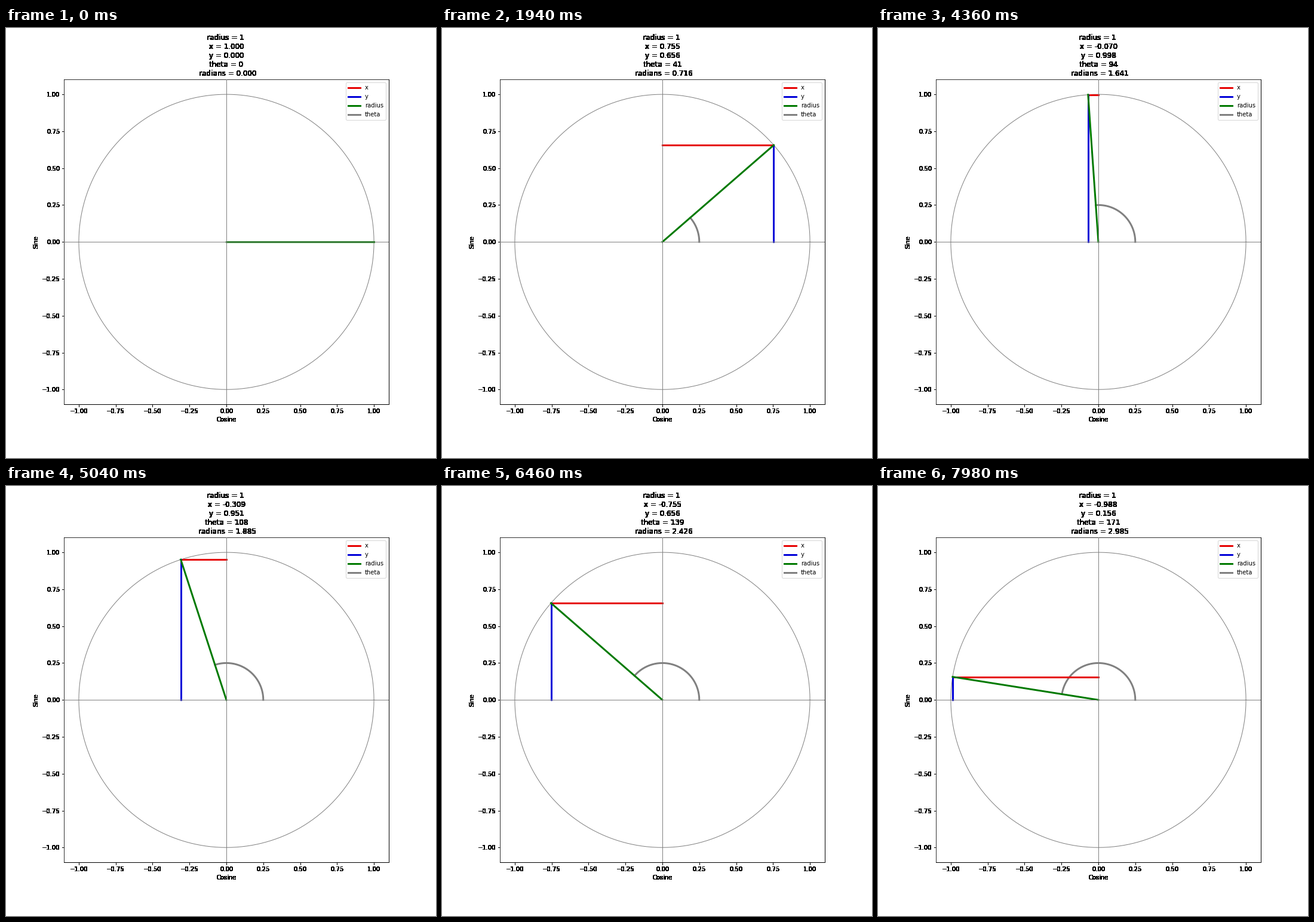
Animation, 720 px wide and 720 px high, one loop 8000 ms. Source, as a matplotlib script:

```python
import numpy as np
import matplotlib.pyplot as plt
from matplotlib.animation import FuncAnimation
from matplotlib.lines import Line2D

SIZE, DPI = 720, 72
SIDE = 0.755                       # square plot area, share of the figure
RECT = [0.5125 - SIDE / 2, 0.125, SIDE, SIDE]
LIMIT = 1.1
COLORS = {"x": "#e60000", "y": "#0000d8", "radius": "#007a00", "theta": "gray"}

plt.rcParams["font.family"] = "DejaVu Sans"
fig = plt.figure(figsize=(SIZE / DPI, SIZE / DPI), dpi=DPI, facecolor="white")


def harden(im, dpi):
    """Turn every touched pixel solid black, without soft edges."""
    im[..., :3] = 0
    im[..., 3] = im[..., 3] > 0
    return im, 0, 0


def add_axes():
    return fig.add_axes(RECT, xlim=(-LIMIT, LIMIT), ylim=(-LIMIT, LIMIT))


def draw_static():
    """Render the fixed parts once and return them as an image."""
    ax = add_axes()
    ax.set_xticks(np.arange(-1, 1.01, 0.25))
    ax.set_yticks(np.arange(-1, 1.01, 0.25))
    ax.set_xlabel("Cosine")
    ax.set_ylabel("Sine")

    turn = np.linspace(0, 2 * np.pi, 361)
    ax.plot(np.cos(turn), np.sin(turn), color="gray", lw=1)

    keys = [Line2D([], [], color=c, lw=3, label=n) for n, c in COLORS.items()]
    ax.legend(handles=keys, loc="upper right")

    # A clear figure made opaque afterwards gives hard text around the axes.
    fig.patch.set_alpha(0)
    fig.canvas.draw()
    image = np.array(fig.canvas.buffer_rgba())
    image[..., 3] = 255
    fig.patch.set_alpha(1)
    ax.remove()
    return image


fig.figimage(draw_static(), origin="upper", zorder=-1)

ax = add_axes()
ax.axis("off")
title = ax.set_title("")
title.set_agg_filter(harden)
lines = {n: ax.plot([], [], color=c, lw=3)[0] for n, c in COLORS.items()}
lines["theta"].set_zorder(1.9)
ax.axvline(0, color="gray", lw=1)
ax.axhline(0, color="gray", lw=1)


def degrees(frame):
    """Three steps every seven ticks, held for 1, 5 and 1 ticks."""
    cycle, tick = divmod(frame, 7)
    return 3 * cycle + (tick >= 1) + (tick >= 6)


def update(frame):
    theta = degrees(frame)
    rad = np.radians(theta)
    x, y = np.cos(rad), np.sin(rad)
    sweep = np.linspace(0, rad, theta + 2)

    lines["x"].set_data([0, x], [y, y])
    lines["y"].set_data([x, x], [0, y])
    lines["radius"].set_data([0, x], [0, y])
    lines["theta"].set_data(0.25 * np.cos(sweep), 0.25 * np.sin(sweep))
    title.set_text(f"radius = 1 \n x = {x:.3f} \n y = {y:.3f} \n "
                   f"theta = {theta} \n radians = {rad:.3f}")
    return [*lines.values(), title]


anim = FuncAnimation(fig, update, frames=400, interval=20, repeat=True)
plt.show()
```
